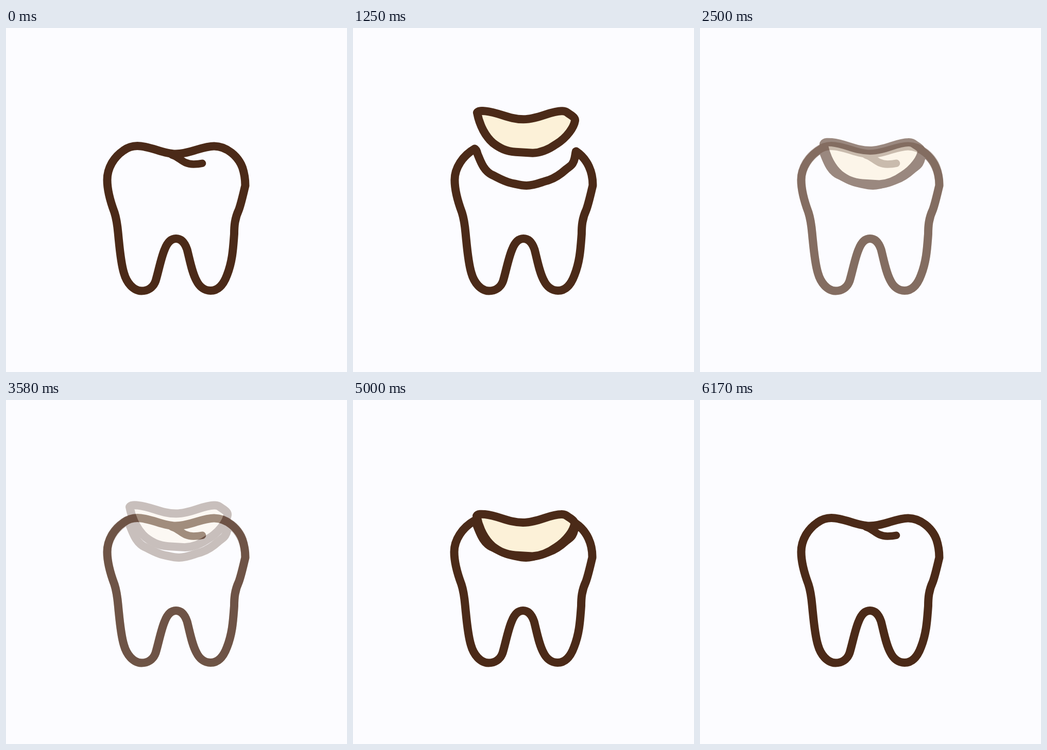
Recreate the animation shown at these times as an HTML page. Size 662 by 668 pixels, loop 6580 ms.

```html
<!DOCTYPE html>
<html lang="en">
<head>
<meta charset="utf-8">
<title>Tooth inlay</title>
<style>
  html, body { margin: 0; width: 100%; height: 100%; overflow: hidden; background: #fcfcff; }
  svg { display: block; width: 662px; height: 668px; }
  path { fill: none; stroke: #4b2a18; stroke-width: 16; stroke-linejoin: round; stroke-linecap: round; }
  #cap { fill: #fcf1d8; }
</style>
</head>
<body>
<svg viewBox="0 0 662 668">
  <defs>
    <g id="whole">
      <path id="outline"/>
      <path d="M322 246.5C338 251 342 264 364 264.5Q374 264.5 381 262.8" style="stroke-width:14.5"/>
    </g>
  </defs>
  <use id="wholeBelow" href="#whole"/>
  <g id="split">
    <path id="notched"/>
    <path id="cap" d="M240 164C242 160 250 160.500 256 161C284 164 302 177 330 177C358 177 382 161 404 161C411 160.500 414 163 418 166C426 171 431 175 430 180C428 192 415 212 394 225C380 235 365 242 348 242.500L315 240.500C296 239 284 233 271 223C257 211 245 190 240 164Z"/>
  </g>
  <use id="wholeAbove" href="#whole"/>
</svg>
<script>
const $ = id => document.getElementById(id);

// Left side, both roots and right side, shared by the two tooth shapes
const body = `C196.500 314 203 338 210.500 358C217 378 217 395 219 412
  C221.500 438 224 460 229 476C234 494 247 510.500 263 510.500
  C275 510.500 286 504 290.500 491C296 473 301 446 308 430
  C313 417 320 409 330 409C340 409 347 417 351.500 430
  C357 451 361 475 370 491C376 503 386 510 397 510
  C412 510 422 499 429 480C440 452 441 426 443 400
  C443 385 444 370 452 353C457 339 461 320 464.500 306`;

$('outline').setAttribute('d', `M255 229C244 229 236 232 228 238
  C209 251 196.500 272 196.500 295${body}
  C464.500 295 463 283 459 271C451 249 428 229.500 404 229.500
  C380 229.500 358 244.500 329 244.500C305 244.500 280 229 255 229Z`);

$('notched').setAttribute('d', `M235.500 234.500
  C212 248 196.500 272 196.500 295${body}
  C465 280 455 255 432 239.500C430 245 431 254 426 262
  C424 267 418 270 412 275C401 285 392 291 379 295.500
  C365 299 352 306 336 306C326 306 316 303 306 301
  C293 298 283 292 271 286C253 279 246 257 241 245Q239 236 235.500 234.500Z`);

const LOOP = 6580, FPS = 12, DURATION = 300, DROP = 61;
const STATES = ['whole', 'split', 'filled'];
const STARTS = [60, 1249, 2448, 3531, 4645, 5805];

const easeOut = t => 1 - (1 - t) ** 1.75;

function show({ below = 0, split = 0, above = 0, drop = 0, shift = 0 }) {
  $('wholeBelow').setAttribute('opacity', below);
  $('split').setAttribute('opacity', split);
  $('split').setAttribute('transform', `translate(${shift} 0)`);
  $('cap').setAttribute('transform', `translate(0 ${drop})`);
  $('wholeAbove').setAttribute('opacity', above);
}

function draw() {
  const frame = Math.floor(performance.now() % LOOP * FPS / 1000 + 0.045);
  const time = frame * 1000 / FPS;
  const step = STARTS.filter(start => start <= time).length - 1;
  const p = step < 0 ? 0 : easeOut(Math.min(1, (time - STARTS[step]) / DURATION));
  const from = STATES[Math.max(step, 0) % 3];

  if (from === 'whole') {
    show({ below: 1 - p, split: p, drop: DROP * (1 - p) });
  } else if (from === 'split') {
    show({ split: 1, drop: DROP * p, shift: 0.9 * (1 - p) });
  } else {
    show({ split: (1 - p) ** 1.8, above: p, drop: DROP });
  }
  requestAnimationFrame(draw);
}
draw();
</script>
</body>
</html>
```
